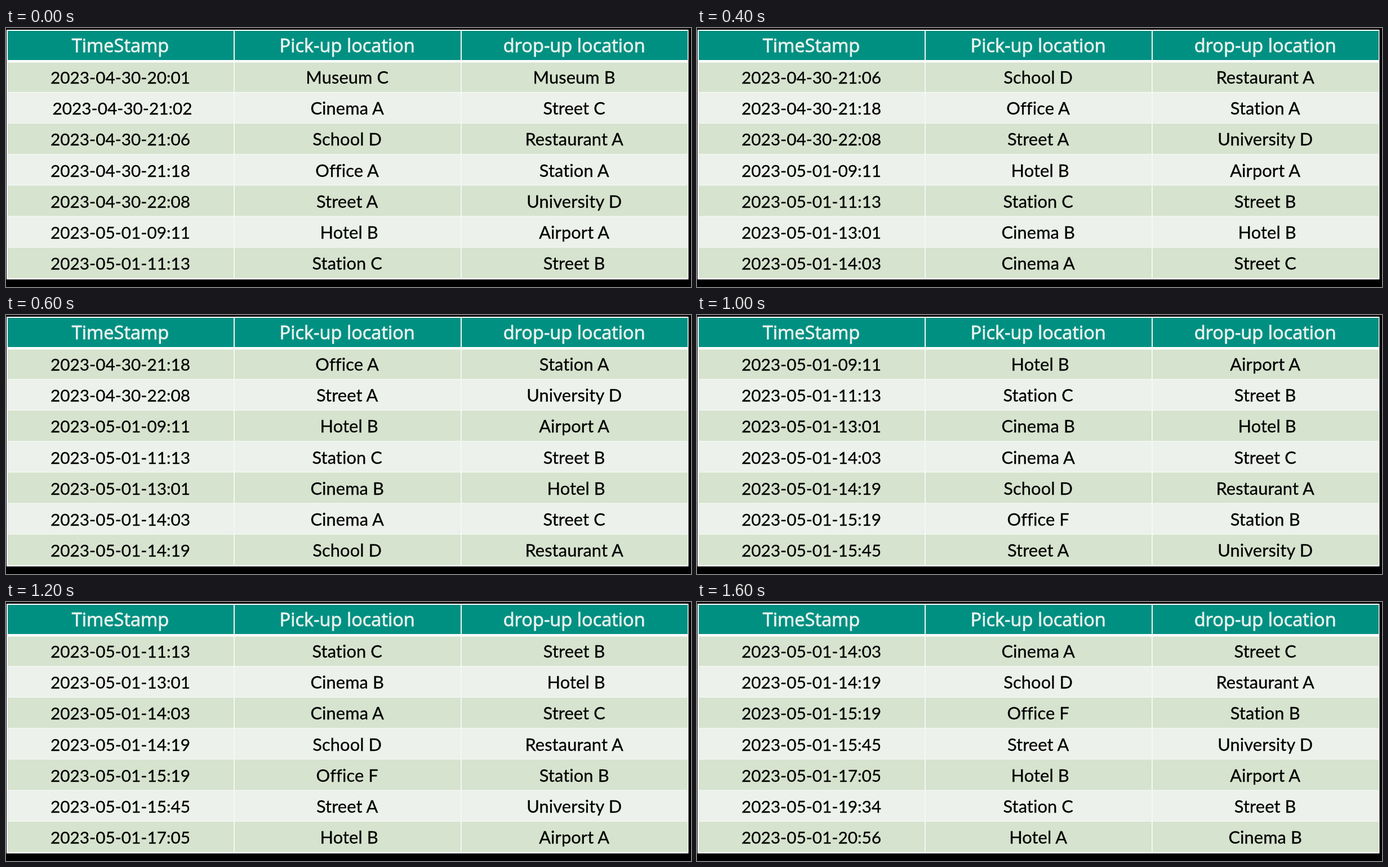
These frames come from a looping animation (1216 px wide and 461 px high, 1800 ms). An HTML page:

```html
<!DOCTYPE html>
<html lang="en">
<head>
<meta charset="utf-8">
<title>Trip log</title>
<style>
  html, body { margin: 0; width: 100%; height: 100%; overflow: hidden; background: #000; }
  svg { display: block; width: 1216px; height: 461px; }
  text { text-anchor: middle; font-variant-ligatures: none; }
  .head { font: 32.6px "Open Sans", "Noto Sans", sans-serif; fill: #e9f3ee; stroke: #e9f3ee; stroke-width: .8px; }
  .time, .place { font: 29.8px Lato, "Open Sans", sans-serif; fill: #000; stroke: #000; stroke-width: .3px; }
  .place { font-size: 30.8px; letter-spacing: .1px; }
</style>
</head>
<body>
<svg id="stage" viewBox="0 0 1216 461"></svg>
<script>
const STEP = 200, FRAMES = 9, ROWS = 7, PITCH = 55.2;
const centers = [203, 605.7, 1008.7];
const heads = ["TimeStamp", "Pick-up location", "drop-up location"];
// A leading space nudges the centred text to the right.
const trips = [
  ["2023-04-30-20:01", "Museum C", "Museum B"],
  [" 2023-04-30-21:02", "Cinema A", "Street C"],
  ["2023-04-30-21:06", "School D", "Restaurant A"],
  ["2023-04-30-21:18", "Office A", "Station A"],
  ["2023-04-30-22:08", "Street A", "University D"],
  ["2023-05-01-09:11", " Hotel B", "Airport A"],
  ["2023-05-01-11:13", "Station C", "Street B"],
  ["2023-05-01-13:01", "Cinema B", " Hotel B"],
  ["2023-05-01-14:03", "Cinema A", "Street C"],
  ["2023-05-01-14:19", "School D", "Restaurant A"],
  ["2023-05-01-15:19", "Office F", "Station B"],
  ["2023-05-01-15:45", "Street A", "University D"],
  ["2023-05-01-17:05", " Hotel B", "Airport A"],
  ["2023-05-01-19:34", "Station C", "Street B"],
  ["2023-05-01-20:56", "Hotel A", "Cinema B"]
];

const stage = document.getElementById("stage");

function add(tag, attrs, label) {
  const el = document.createElementNS("http://www.w3.org/2000/svg", tag);
  for (const key in attrs) el.setAttribute(key, attrs[key]);
  if (label) el.textContent = label;
  return stage.appendChild(el);
}

function box(x, y, right, bottom, fill) {
  add("rect", { x, y, width: right - x, height: bottom - y, fill });
}

box(1, 3, 1211.5, 447.5, "#fff");
box(3, 5, 1210, 57, "#009082");
for (let i = 0; i < ROWS; i++) {
  const top = i ? 59.5 + PITCH * i : 61.5;
  box(3, top, 1210, 58.7 + PITCH * (i + 1), i % 2 ? "#ecf1eb" : "#d6e3ce");
}
for (const x of [404, 807]) box(x, 5, x + 2, 446, "#f4f8f3");

heads.forEach((label, c) => add("text", { x: centers[c], y: 43, class: "head" }, label));

const cells = Array.from({ length: ROWS }, (_, r) =>
  centers.map((_, c) => add("text", { y: 99 + PITCH * r, class: c ? "place" : "time" })));

let shown = -1;
function draw(now) {
  const first = Math.floor(now / STEP) % FRAMES;
  if (first === shown) return;
  shown = first;
  cells.forEach((row, r) => row.forEach((cell, c) => {
    const label = trips[first + r][c];
    cell.setAttribute("x", centers[c] + (label[0] === " " ? 3.5 : 0));
    cell.textContent = label.trim();
  }));
}

const start = performance.now();
function tick() {
  draw(performance.now() - start);
  requestAnimationFrame(tick);
}
tick();
</script>
</body>
</html>
```
